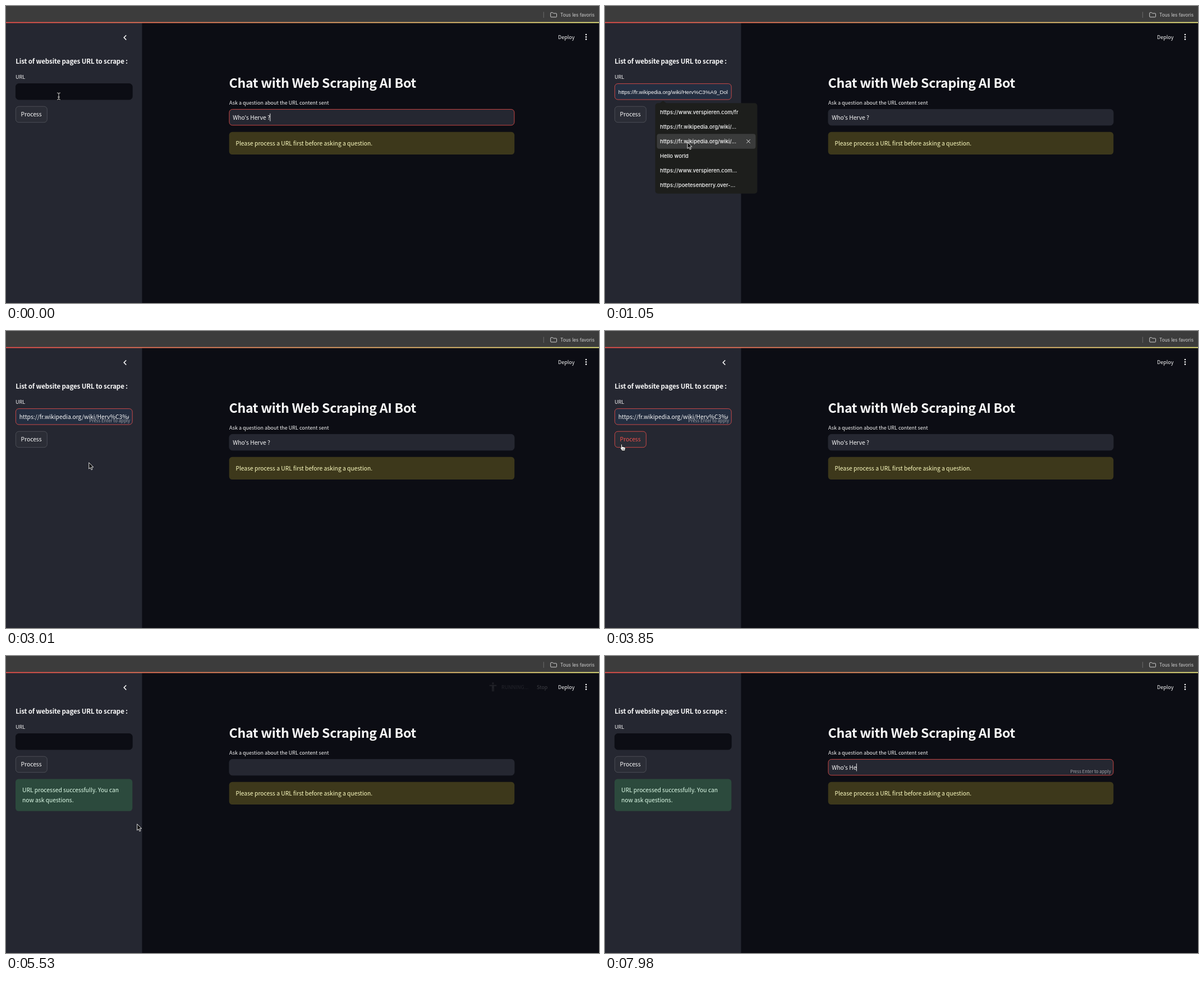
An HTML page for the animation above (8000 ms loop, 1057 by 530 pixels).

```html
<!DOCTYPE html>
<html lang="en">
<head>
<meta charset="utf-8">
<title>Web scraping chat</title>
<style>
  html, body { margin: 0; width: 100%; height: 100%; overflow: hidden; background: #0c0d14; }
  svg { display: block; width: 100vw; height: 100vh; }
  text { white-space: pre; fill: #fafafa; font: 10.31px "Noto Sans CJK SC", "Noto Sans CJK JP", "Noto Sans CJK", "Source Sans 3", sans-serif; }
  .small { font-size: 9.02px; }
  .hint { font-size: 7.85px; fill: #a3a4a9; }
  .title { font-size: 23.2px; font-weight: 700; letter-spacing: -.33px; }
  .side { font-size: 11.6px; font-weight: 700; letter-spacing: -.15px; }
  .ui { font: 500 9.45px Inter, "Liberation Sans", sans-serif; }
  .fav { font: 400 8.25px Inter, "Liberation Sans", sans-serif; fill: #cfcfcf; }
  .plain { font: 9.6px "Liberation Sans", Arial, sans-serif; }
  .line { fill: none; stroke: #fafafa; stroke-linecap: round; stroke-linejoin: round; }
  .caret { stroke: #fafafa; stroke-width: .9; }
</style>
</head>
<body>
<svg viewBox="0 0 1057 530" preserveAspectRatio="none">
  <defs>
    <linearGradient id="rainbow"><stop stop-color="#f2504b"/><stop offset="1" stop-color="#f6f383"/></linearGradient>
    <clipPath id="urlClip"><rect x="20" y="139" width="199" height="28"/></clipPath>
  </defs>

  <rect width="1057" height="530" fill="#0c0d14"/>
  <rect y="29" width="242.5" height="501" fill="#252731"/>
  <rect width="1057" height="29" fill="#3c3c3c"/>
  <rect y="28.7" width="1057" height="1.7" fill="url(#rainbow)"/>

  <path d="M958.3 10.500v10.500" stroke="#6c6c6c"/>
  <path d="M970.700 18.300v-5.600q0-1 1-1h2.700l1.300 1.400h4.800q1 0 1 1v4.700q0 1-1 1h-8.800q-1 0-1-1z" class="line" style="stroke:#cfcfcf"/>
  <text class="fav" x="988" y="18.8">Tous les favoris</text>

  <text class="small" x="984" y="58.6">Deploy</text>
  <g fill="#fafafa"><circle cx="1034" cy="51" r="1.3"/><circle cx="1034" cy="55.200" r="1.3"/><circle cx="1034" cy="59.400" r="1.3"/></g>
  <g id="status">
    <g class="line" style="stroke:#6f7076;stroke-width:2.1;stroke-linecap:butt">
      <circle cx="868" cy="48.700" r="1.7" fill="#6f7076" stroke="none"/>
      <path d="M868 51.500v6" stroke-width="4"/>
      <path d="M866.900 57v6.300M869.100 57v6.300" stroke-width="1.7"/>
      <path id="armL" d="M868 52.700h-6.300"/>
      <path id="armR" d="M868 52.700h6.300"/>
    </g>
    <text class="small" x="883" y="58.6" style="fill:#808187">RUNNING...</text>
    <text class="small" x="946" y="58.6">Stop</text>
  </g>

  <path id="chevron" class="line" d="M213.800 52.700l-3.600 3.600l3.600 3.600" stroke-width="1.6"/>
  <text class="side" x="17.300" y="103.2">List of website pages URL to scrape :</text>
  <text class="small" x="17" y="130.2">URL</text>
  <rect id="urlBox" x="17.400" y="138.600" width="207.800" height="28.400" rx="5.500" stroke-width=".9"/>
  <g clip-path="url(#urlClip)"><text id="urlText" x="23.800" y="156.700"></text></g>
  <text id="urlHint" class="hint" x="148.600" y="163.2">Press Enter to apply</text>
  <path id="urlCaret" class="caret" d="M24.300 146.500v13.200"/>

  <rect id="button" x="17.400" y="179.200" width="55.900" height="28.500" rx="5.500" fill="#2b2d36" stroke-width=".9"/>
  <text id="buttonText" x="26.500" y="197.200">Process</text>

  <g id="success">
    <rect x="17" y="219.500" width="208.300" height="57.300" rx="5.500" fill="#2c4a3d"/>
    <text x="29" y="243.4" style="fill:#dffde9">URL processed successfully. You can</text>
    <text x="29" y="260.7" style="fill:#dffde9">now ask questions.</text>
  </g>

  <text class="title" x="397.500" y="145.900">Chat with Web Scraping AI Bot</text>
  <text class="small" x="398" y="176.2">Ask a question about the URL content sent</text>
  <rect id="askBox" x="398" y="184.400" width="508" height="28.400" rx="5.500" fill="#252731" stroke-width=".9"/>
  <text id="askText" x="404.200" y="202.500"></text>
  <text id="askHint" class="hint" x="829.200" y="209.100">Press Enter to apply</text>
  <path id="askCaret" class="caret" d="M0 191.800v13.800"/>
  <rect x="397.700" y="224.800" width="508.600" height="40.300" rx="5.500" fill="#3d381b"/>
  <text x="409.400" y="248.800" style="fill:#ffffc2">Please process a URL first before asking a question.</text>

  <g id="menu">
    <path d="M97 174l5.500-4.200q1-.7 2 0l5.500 4.200z" fill="#1d1e1c"/>
    <rect x="89.500" y="173.300" width="182" height="161.500" rx="5" fill="#1d1e1c"/>
    <g id="hover">
      <rect x="92.500" y="0" width="176" height="26.600" rx="4" fill="#3a3b3b"/>
      <path class="line" d="M252.700 10.400l5.800 5.800m0-5.800l-5.800 5.800" stroke-width=".9"/>
    </g>
    <g id="rows"></g>
  </g>

  <g id="arrow"><path d="M0 0v11.300l2.600-2.300l1.800 4l1.900-.8l-1.800-4h3.600z" fill="#111" stroke="#f4f4f4" stroke-width=".9" stroke-linejoin="round"/></g>
  <g id="beam" fill="none" stroke-linecap="round">
    <path d="M-2.500-6q2 0 2.500 1.200q.5-1.200 2.500-1.200M0-4.800v9.600M-2.500 6q2 0 2.500-1.200q.5 1.200 2.500 1.200M-1.500 1.500h3" stroke="#111" stroke-width="2.200"/>
    <path d="M-2.500-6q2 0 2.500 1.200q.5-1.200 2.500-1.200M0-4.800v9.600M-2.500 6q2 0 2.500-1.200q.5 1.200 2.500 1.200M-1.500 1.500h3" stroke="#e8e8e8" stroke-width=".9"/>
  </g>
  <g id="hand">
    <path d="M-1 1q0-1.100 1-1.100t1.100 1.100v3.400l4.300.8q1.500.3 1.500 1.800l-.7 3.200v1.600h-5.200l-3.300-4.800q-.7-1.300.3-1.500l1 .9z" fill="#f4f4f4" stroke="#111" stroke-width=".8" stroke-linejoin="round"/>
    <path d="M2.200 7.800v2.400M4 7.800v2.400" stroke="#111" stroke-width=".6"/>
  </g>
</svg>
<script>
const LOOP = 8000, STEP = 70;
const $ = Object.fromEntries([...document.querySelectorAll("svg [id]")].map(e => [e.id, e]));
const RED = "#dc4c49";
const QUESTION = "Who's Herve ?";
const WIKI = "https://fr.wikipedia.org/wiki/";
const LINK = WIKI + "Herv%C3%A9_Dolbec";
const TYPED_AT = [6790, 6930, 7140, 7350, 7490, 7630, 7770, 7980];
const ROWS = ["https://www.verspieren.com/fr", WIKI + "...", WIKI + "...", "Hello world",
  "https://www.verspieren.com...", "https://poetesenberry.over-..."];
const PREVIEWS = [ROWS[0], WIKI, LINK];
const ROW_TOP = 176, ROW_H = 26;

// Pointer hot spot: time, x, y
const PATH = [
  [0, 94, 161], [630, 94, 161], [1050, 147, 243], [1120, 148, 247], [1190, 148, 247],
  [1400, 149, 250], [1610, 152, 249], [1890, 152, 249], [2170, 159, 238], [2870, 159, 238],
  [3640, 30, 201], [3710, 30, 201], [3850, 29.500, 202], [4340, 29.500, 202], [4550, 8, 245],
  [4760, 40, 287], [5180, 150, 297], [5530, 233.700, 299.800], [5740, 233.700, 299.800], [6370, 613, 199]
];

ROWS.forEach((label, i) => {
  const row = document.createElementNS("http://www.w3.org/2000/svg", "text");
  row.setAttribute("class", "ui");
  row.setAttribute("x", 98);
  row.setAttribute("y", 192.8 + i * 26.050);
  row.textContent = label;
  $.rows.append(row);
});

const within = (t, a, b) => t >= a && t < b;
const clamp = v => Math.max(0, Math.min(1, v));
const show = (el, on) => el.style.display = on ? "" : "none";
const place = (el, x, y) => el.setAttribute("transform", `translate(${x} ${y})`);
const setText = (el, s) => { if (el.textContent !== s) el.textContent = s; };
const inside = (p, x, y, w, h) => p.x >= x && p.x < x + w && p.y >= y && p.y < y + h;

function pointer(t) {
  const next = PATH.findIndex(k => k[0] > t);
  if (next < 0) return { x: PATH.at(-1)[1], y: PATH.at(-1)[2] };
  const [t0, x0, y0] = PATH[next - 1], [t1, x1, y1] = PATH[next];
  const u = (t - t0) / (t1 - t0), e = u * u * (3 - 2 * u);
  return { x: x0 + (x1 - x0) * e, y: y0 + (y1 - y0) * e };
}

function drawPointer(p, t, menuOpen) {
  const overField = !menuOpen && (inside(p, 17, 138, 208, 29) || inside(p, 398, 184, 508, 29))
    || inside(p, 17, 138, 208, 29);
  const overButton = !menuOpen && inside(p, 17, 179, 57, 29);
  const kind = t >= 7140 ? "" : overField ? "beam" : overButton ? "hand" : "arrow";
  for (const name of ["arrow", "beam", "hand"]) {
    show($[name], name === kind);
    place($[name], p.x, p.y);
  }
  return overButton;
}

function drawUrl(t, row) {
  const focused = within(t, 70, 3990), filled = within(t, 2660, 3990);
  const preview = row >= 0;
  $.urlBox.setAttribute("fill", filled || preview ? "#242e40" : "#0c0d14");
  $.urlBox.setAttribute("stroke", focused ? RED : "#0c0d14");
  $.urlText.setAttribute("class", preview ? "plain" : "");
  setText($.urlText, filled ? LINK : preview ? PREVIEWS[row] || "" : "");
  show($.urlHint, filled);
  show($.urlCaret, within(t, 70, 700) || within(t, 1260, 1750) || within(t, 2310, 2660));
}

function drawQuestion(t) {
  const typed = TYPED_AT.filter(at => t >= at).length;
  const focused = t < 70 || t >= 6440;
  setText($.askText, t < 3990 ? QUESTION : QUESTION.slice(0, typed));
  $.askBox.setAttribute("stroke", focused ? RED : "#292b35");
  show($.askHint, typed > 0);
  show($.askCaret, focused);
  const width = $.askText.textContent ? $.askText.getComputedTextLength() : 0;
  place($.askCaret, 404.200 + width, 0);
}

function drawStatus(t) {
  $.status.style.opacity = t < 3990 ? 0 : Math.min(clamp((t - 3920) / 210), clamp((5600 - t) / 350));
  const swing = 25 * Math.sin((t - 4340) / 595 * 2 * Math.PI);
  $.armL.setAttribute("transform", `rotate(${swing} 868 52.7)`);
  $.armR.setAttribute("transform", `rotate(${swing} 868 52.7)`);
}

function draw(time) {
  const t = Math.floor(time / STEP) * STEP;
  const p = pointer(t);
  const menuOpen = within(t, 140, 2660);
  const row = menuOpen && p.x > 89 && p.y >= ROW_TOP ? Math.floor((p.y - ROW_TOP) / ROW_H) : -1;

  show($.menu, menuOpen);
  show($.hover, row >= 0);
  place($.hover, 0, ROW_TOP + Math.max(row, 0) * ROW_H + .2);
  show($.chevron, t < 5740 ? row < 0 : p.x < 242);

  const hot = drawPointer(p, t, menuOpen);
  $.button.setAttribute("stroke", hot ? RED : "#50525a");
  $.buttonText.style.fill = hot ? "#f0504c" : "";

  drawUrl(t, row);
  drawQuestion(t);
  drawStatus(t);
  $.success.style.opacity = clamp((t - 5110) / 210);
}

let start;
function tick(now) {
  start ??= now;
  draw((now - start) % LOOP);
  requestAnimationFrame(tick);
}
draw(0);
requestAnimationFrame(tick);
</script>
</body>
</html>
```
